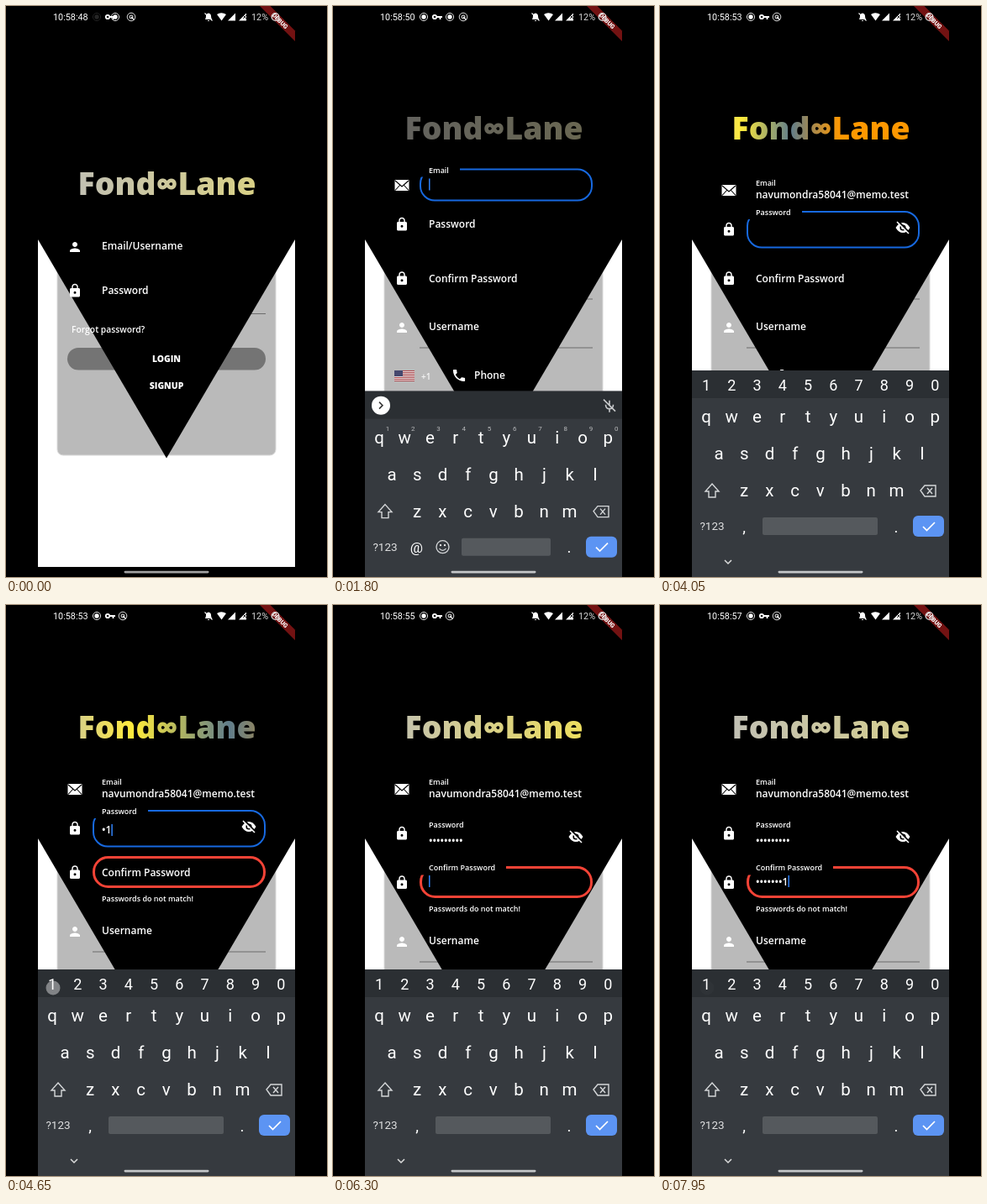
An HTML page that plays this animation: 382x680 px, repeating every 8000 ms.

```html
<!DOCTYPE html>
<html lang="en">
<head>
<meta charset="utf-8">
<title>Sign-up form</title>
<style>
html, body { margin: 0; width: 100%; height: 100%; overflow: hidden; background: #000; }
svg { display: block; width: 382px; height: 680px; }
text { font-family: "Open Sans", sans-serif; font-weight: 600; fill: #fff; white-space: pre; }
#keys text, #bar text { font-family: Roboto, sans-serif; font-weight: 400; }
#title { font-size: 37.3px; font-weight: 800; fill: url(#shine); text-anchor: middle; }
</style>
</head>
<body>
<svg id="stage" viewBox="0 0 382 680">
  <defs>
    <linearGradient id="shine" gradientUnits="userSpaceOnUse" x1="38" x2="300" y1="0" y2="0">
      <stop offset="0" stop-color="#bdbdbd"/>
      <stop offset=".3333" stop-color="#ffeb3b"/>
      <stop offset=".6667" stop-color="#607d8b"/>
      <stop offset="1" stop-color="#ff9800"/>
    </linearGradient>
    <clipPath id="input"><rect x="113.5" y="0" width="186" height="680"/></clipPath>
    <clipPath id="phone"><rect x="38" width="306" height="680"/></clipPath>
  </defs>
  <rect width="382" height="680"/>
  <rect x="38" y="270" width="306" height="398" fill="#fff"/>
  <g id="low"></g>
  <path d="M38 0H344V278L191 538.5L38 278Z"/>
  <text id="title" x="191.5">Fond∞Lane</text>
  <g id="form"></g>
  <g id="keys" clip-path="url(#phone)"></g>
  <g id="bar"></g>
  <circle id="touch" r="8.5" fill="#fff"/>
</svg>
<script>
const LOOP = 8000;
const $ = id => document.getElementById(id);
const low = $("low"), form = $("form"), bar = $("bar");

// Moments at which the form changes
const SIGNUP = 250, EMAIL = 1500, FILL = 3080, PASS = 3500, ERR = 4440, CONFIRM = 6050;
const USER = "tenavu", MAIL = "tenavumondra58041@memo.test";
const emailType = { at: 2040, gap: 150, n: 6 };
const passType = { at: ERR, gap: 190, n: 9 };
const confType = { at: 6500, gap: 190, n: 8 };

const clamp = x => Math.max(0, Math.min(1, x));
const ease = x => x * x * (3 - 2 * x);
// Value at t after a series of eased [start, target] changes
function track(t, v, ...steps) {
  for (const [at, to] of steps) v += (to - v) * ease(clamp((t - at) / 200));
  return v;
}
const typed = (t, s) => t < s.at ? 0 : Math.min(s.n, 1 + Math.floor((t - s.at) / s.gap));

function set(node, attrs) {
  for (const k in attrs) node.setAttribute(k, attrs[k]);
  return node;
}
function el(parent, tag, attrs = {}) {
  return parent.appendChild(set(document.createElementNS("http://www.w3.org/2000/svg", tag), attrs));
}
const group = (p, attrs) => el(p, "g", attrs);
const path = (p, d, attrs) => el(p, "path", { d, fill: "#fff", ...attrs });
const stroke = (p, d, color = "#fff", w = 1.5) => path(p, d, { fill: "none", stroke: color, "stroke-width": w });
const rect = (p, x, y, width, height, fill, rx = 0) => el(p, "rect", { x, y, width, height, fill, rx });
const dot = (p, cx, cy, r, attrs) => el(p, "circle", { cx, cy, r, fill: "#fff", ...attrs });
const move = (n, x, y, s = 1) => set(n, { transform: `translate(${x} ${y}) scale(${s})` });
const show = (n, o) => set(n, { opacity: +o });
// y is the optical middle of the line
function label(p, x, y, str, size, attrs) {
  const n = el(p, "text", { x, y: y + size * .36, "font-size": size, ...attrs });
  n.textContent = str;
  return n;
}
const mid = { "text-anchor": "middle" };
const heavy = { ...mid, style: "font-weight:800" };

// Icons, centred on 0,0
const glyphs = {
  person: "M12 12c2.2 0 4-1.8 4-4s-1.8-4-4-4-4 1.8-4 4 1.8 4 4 4zm0 2c-2.7 0-8 1.3-8 4v2h16v-2c0-2.7-5.3-4-8-4z",
  lock: "M18 8h-1V6c0-2.8-2.2-5-5-5S7 3.2 7 6v2H6c-1.1 0-2 .9-2 2v10c0 1.1.9 2 2 2h12c1.1 0 2-.9 2-2V10c0-1.1-.9-2-2-2zm-6 9a2 2 0 010-4 2 2 0 010 4zm3.1-9H8.9V6a3.1 3.1 0 016.2 0z",
  phone: "M6.6 10.8c1.4 2.8 3.8 5.1 6.6 6.6l2.2-2.2c.3-.3.7-.4 1-.2 1.1.4 2.3.6 3.6.6.5 0 1 .4 1 1V20c0 .5-.5 1-1 1C10.6 21 3 13.4 3 4c0-.5.5-1 1-1h3.5c.5 0 1 .5 1 1 0 1.3.2 2.5.6 3.6.1.3 0 .7-.3 1z"
};
function icon(p, name) {
  const g = group(p);
  path(g, glyphs[name], { transform: "scale(.75) translate(-12 -12)" });
  return g;
}
function mailIcon(p) {
  const g = group(p);
  rect(g, -8.5, -6.5, 17, 13, "#fff", 1);
  stroke(g, "M-8-5.5L0 1.5L8-5.5M-8 6L-2.5 0M8 6L2.5 0", "#000", 1.1);
  return g;
}
function eyeOff(p) {
  const g = group(p);
  path(g, "M-8.5 0Q-5-6 0-6T8.5 0Q5 6 0 6T-8.5 0");
  dot(g, 0, 0, 3.6, { fill: "#000" });
  dot(g, 0, 0, 2);
  stroke(g, "M-6-8L8 6", "#000", 2);
  stroke(g, "M-7-7L7 7");
  return g;
}

// Layer under the dark wedge
const card = rect(low, 61, 250, 260, 285, "#bababa", 7);
set(card, { stroke: "#d8d8d8", "stroke-width": 1 });
const line = (p, x, y) => rect(p, x, y - .5, 309 - x, 1, "#6c6c6c");
const loginLine = line(low, 103, 366.5);
const confLine = line(low, 103, 361);
const lowRest = group(low);
line(lowRest, 103, 419);
line(lowRest, 132, 477);
const button = rect(low, 73, 407, 236, 26.5, "#747474", 13.2);

// Form
const loginOnly = group(form), signOnly = group(form);
label(loginOnly, 78, 385, "Forgot password?", 10.3);
const loginMail = group(form);
move(icon(loginMail, "person"), 82, 1);
label(loginMail, 114, 0, "Email/Username", 12);
const act1 = label(form, 191, 0, "LOGIN", 10.4, heavy);
const act2 = label(form, 191, 0, "SIGNUP", 10.4, heavy);

function field(name, iconNode, gapEnd, color, width) {
  const f = { box: group(form) };
  f.frame = rect(f.box, 103 + width / 2, 0, 206 - width, 36, "none", 17);
  set(f.frame, { stroke: color, "stroke-width": width });
  f.gap = rect(f.box, 100, -4, gapEnd - 100, 13, "#000");
  f.icon = iconNode;
  f.name = group(form);
  label(f.name, 0, 0, name, 12);
  const clip = group(form, { "clip-path": "url(#input)" });
  f.text = label(clip, 114, 0, "", 12);
  f.cursor = rect(form, 0, -7, 1.5, 14, "#2f80f5");
  return f;
}
const email = field("Email", mailIcon(form), 151, "#1769e0", 2);
const pass = field("Password", icon(form, "lock"), 169, "#1769e0", 2);
const conf = field("Confirm Password", icon(signOnly, "lock"), 206, "#f44336", 3);
const compose = rect(form, 114, 218.5, 10, 1, "#fff");
const eye = eyeOff(form);
const error = label(form, 114, 0, "Passwords do not match!", 9);

const rest = group(signOnly);
move(icon(rest, "person"), 82, 395);
label(rest, 114, 394, "Username", 12);
const flag = group(rest);
rect(flag, 73, 446, 24, 13, "#e4dede");
for (let i = 0; i < 7; i++) rect(flag, 73, 446 + i * 2, 24, 1, "#b04a50");
rect(flag, 73, 446, 10, 7, "#45486e");
label(rest, 105, 453, "+1", 10, { opacity: .85 });
move(icon(rest, "phone"), 150, 452, 1.05);
label(rest, 168, 452, "Phone", 12);

// Keyboard
const kb = group($("keys"));
rect(kb, 38, 434, 306, 246, "#363a3f");
rect(kb, 38, 434, 306, 33, "#2b2f33");
const mailKeys = group(kb), passKeys = group(kb);
const spots = {};
[["qwertyuiop", 55, 489], ["asdfghjkl", 70, 533], ["zxcvbnm", 100, 577]].forEach(([row, x0, y]) =>
  [...row].forEach((c, i) => {
    spots[c] = [x0 + i * 30.25, y];
    label(kb, ...spots[c], c, 20.5, mid);
  }));
for (let i = 0; i < 10; i++) {
  const x = 55 + i * 30.25, d = (i + 1) % 10;
  label(mailKeys, x + 10, 478, d, 8, { ...mid, opacity: .65 });
  label(passKeys, x, 451.5, d, 18, mid);
}
stroke(kb, "M62 569L70 578H66V585H58V578H54Z", "#d5d7d9", 1.4);
stroke(kb, "M310 577L315 571H328V584H315ZM318 574L324 581M324 574L318 581", "#d5d7d9", 1.4);
label(kb, 62, 619.5, "?123", 13.5, { ...mid, opacity: .85 });
label(kb, 281, 620, ".", 19, mid);
rect(kb, 301, 607, 37, 25, "#5c94f3", 6);
stroke(kb, "M313 620L317.5 624.5L327 615", "#fff", 1.7);
stroke(kb, "M77 660L81 664L85 660", "#ddd");
rect(passKeys, 122, 609, 137, 21, "#55595d", 2);
label(passKeys, 100, 620, ",", 19, mid);
rect(mailKeys, 153, 609, 106, 21, "#55595d", 2);
label(mailKeys, 99.5, 620, "@", 17, mid);
stroke(mailKeys, "M123 619.5a7.5 7.5 0 0 1 15 0a7.5 7.5 0 0 1-15 0M126.5 621.5Q130.5 626 134.5 621.5", "#d5d7d9", 1.3);
dot(mailKeys, 128, 617.5, 1.1);
dot(mailKeys, 133, 617.5, 1.1);

// Suggestions
dot(mailKeys, 57, 451, 11);
stroke(mailKeys, "M55 447L59 451L55 455", "#333");
const hint = label(mailKeys, 105.5, 451, "", 13.5, { ...mid, opacity: .8 });
const hints = group(mailKeys);
[[186, "tenavum…a58041"], [273, "tenavum…dra41"]].forEach(([x, s]) => {
  label(hints, x, 443, s, 10.2, mid);
  label(hints, x + 4, 457, "@memo.test", 9.3, { ...mid, opacity: .8 });
});
rect(hints, 145, 443, 1, 16, "#44494e");
rect(hints, 232, 443, 1, 16, "#44494e");
stroke(mailKeys, "M329 445v6M324.5 450q0 5 4.5 5t4.5-5M329 455v4M322 444L336 458", "#c8cacc", 1.6);

// Debug ribbon and status bar
path(bar, "M302 0H314.5L344 29.5V42Z", { fill: "#731212" });
label(bar, 0, 0, "DEBUG", 7.2, { ...mid, transform: "translate(326.2 17.8) rotate(45)", style: "font-weight:900" });
const clock = label(bar, 56, 13, "", 10.8);
function record() {
  const g = group(bar);
  dot(g, 0, 0, 4.6, { fill: "none", stroke: "#ddd" });
  dot(g, 0, 0, 2.7);
  return g;
}
const rec1 = record(), rec2 = record(), key = group(bar), cast = group(bar);
dot(key, -3, 0, 2.2, { fill: "none", stroke: "#fff", "stroke-width": 1.8 });
stroke(key, "M-1 0H6M3.5 0v3", "#fff", 1.8);
dot(cast, 0, 0, 4.8, { fill: "none", stroke: "#ddd" });
dot(cast, 0, 0, 2, { fill: "none", stroke: "#fff" });
stroke(cast, "M0 0L3.5 3.5", "#fff", 1.3);
path(bar, "M237 16Q238 14 238 12Q238 9 241 8.5Q244 9 244 12Q244 14 245 16ZM240 17h2v1h-2Z");
stroke(bar, "M236.5 8.5L245.5 17.5", "#fff", 1.1);
path(bar, "M251 10Q256.5 6.5 262 10L256.5 17.5Z");
path(bar, "M264 17.5L273 8.5V17.5ZM277 17.5L286 8.5V17.5Z");
stroke(bar, "M282 11L286 15M286 11L282 15", "#000", .8);
label(bar, 292, 13, "12%", 10.8, { opacity: .85 });
dot(bar, 320.5, 13, 4.3, { fill: "none", stroke: "#ddd", "stroke-width": 1.3 });
const pill = rect(bar, 140.5, 672.7, 101, 2.8, "#a2a2a2", 1.4);

// Screen touches: [time, x, y]
const taps = [[SIGNUP - 60, 191, 452], [EMAIL - 60, 200, 219], [FILL - 40, 186, 450],
  [PASS - 60, 200, 260], [CONFIRM - 60, 200, 318]];
[...USER].forEach((c, i) => taps.push([emailType.at + i * emailType.gap, ...spots[c]]));
for (const s of [passType, confType])
  for (let i = 0; i < s.n; i++) taps.push([s.at + i * s.gap, 56, 456]);

function drawCursor(f, t, on, y, last) {
  const x = Math.min(298, 114 + f.text.getComputedTextLength());
  move(f.cursor, x, y);
  show(f.cursor, on && (t - last) % 1000 < 500);
}
function frame(f, top, height, alpha, gap) {
  move(f.box, 0, top);
  set(f.frame, { height });
  show(f.box, alpha);
  show(f.gap, gap);
}
const textY = (f, y) => set(f.text, { y: y + 4.3 });
const secret = (n, open) => n && open ? "•".repeat(n - 1) + "1" : "•".repeat(n);
const lastKey = (s, n, from) => n ? s.at + (n - 1) * s.gap : from;

// The gradient stretches from left to right while the title fades in and out
function drawTitle(t) {
  const cycle = 7500;
  const age = (t - 2570 + cycle) % cycle;
  set($("shine"), { x2: 38.5 + 180 * Math.pow(age / 1500, 1.95) });
  set($("title"), {
    y: track(t, 225, [SIGNUP, 158.5]),
    opacity: Math.min(clamp(age / 700), clamp((cycle - age) / 1500))
  });
}

function drawForm(t) {
  const to = (y, ...s) => track(t, y, ...s);
  const sign = to(0, [SIGNUP, 1]), isSign = t > SIGNUP + 100;
  const off = to(0, [EMAIL, -12], [ERR, -6], [CONFIRM, 6]);

  set(card, { height: to(285, [SIGNUP, 351]) + off });
  set(button, { y: to(407, [SIGNUP, 490]) + off });
  set(act1, { y: to(424, [SIGNUP, 507.3]) + off });
  set(act2, { y: to(455.5, [SIGNUP, 538.8]) + off });
  act1.textContent = isSign ? "SIGN UP" : "LOGIN";
  act2.textContent = isSign ? "LOGIN" : "SIGNUP";
  show(loginOnly, 1 - sign);
  show(loginLine, 1 - sign);
  show(signOnly, sign);
  show(lowRest, sign);
  move(rest, 0, off);
  move(lowRest, 0, off);
  move(loginMail, 0, to(286, [SIGNUP, 219]));
  show(loginMail, !isSign);

  // Email
  const nMail = typed(t, emailType), filled = t >= FILL;
  move(email.icon, 82, to(287, [SIGNUP, 219.5], [EMAIL, 213.5], [PASS, 219.5]));
  show(email.icon, isSign);
  move(email.name, 114, to(286, [SIGNUP, 219], [EMAIL, 195.5], [PASS, 211]), to(1, [EMAIL, .75]));
  show(email.name, isSign);
  frame(email, to(201, [EMAIL, 194.5], [PASS, 202]), 37, to(0, [EMAIL, 1], [PASS, 0]), 1);
  email.text.textContent = filled ? MAIL : USER.slice(0, nMail);
  set(email.text, { x: filled ? 296 : 114, "text-anchor": filled ? "end" : "start" });
  textY(email, to(213, [PASS, 225]));
  drawCursor(email, t, t > EMAIL && t < PASS, 212.5, filled ? FILL : lastKey(emailType, nMail, EMAIL));
  set(compose, { width: filled ? 0 : email.text.getComputedTextLength() });

  // Password
  const nPass = typed(t, passType);
  move(pass.icon, 82, to(339, [SIGNUP, 272], [EMAIL, 260], [PASS, 266], [CONFIRM, 272]));
  move(pass.name, 114, to(339, [SIGNUP, 272], [EMAIL, 260], [PASS, 246], [CONFIRM, 261.5]), to(1, [PASS, .75]));
  frame(pass, to(245, [CONFIRM, 251.5]), 42.5, to(0, [PASS, 1], [CONFIRM, 0]), 1);
  pass.text.textContent = secret(nPass, t < CONFIRM);
  textY(pass, to(268, [CONFIRM, 280.5]));
  drawCursor(pass, t, t > PASS && t < CONFIRM, 268, lastKey(passType, nPass, PASS));
  move(eye, 289, to(264, [CONFIRM, 276]));
  show(eye, to(0, [PASS, 1]));

  // Confirm password
  const nConf = typed(t, confType);
  move(conf.icon, 82, to(337, [EMAIL, 324.5], [ERR, 318.5], [CONFIRM, 330.5]));
  move(conf.name, 114, to(337, [EMAIL, 324.5], [ERR, 318.5], [CONFIRM, 313]), to(1, [CONFIRM, .75]));
  show(conf.name, sign);
  frame(conf, to(300.5, [CONFIRM, 312.5]), 35, to(0, [ERR, 1]), t > CONFIRM + 80);
  conf.text.textContent = secret(nConf, true);
  textY(conf, 329.5);
  drawCursor(conf, t, t > CONFIRM, 329, lastKey(confType, nConf, CONFIRM));
  set(error, { y: to(353.3, [CONFIRM, 365.3]) });
  show(error, to(0, [ERR, 1]));
  move(confLine, 0, off);
  show(confLine, sign * to(1, [ERR, 0]));

  // Keyboard
  move(kb, 0, 246 * (1 - ease(clamp((t - 1600) / 250))));
  show(mailKeys, t < PASS + 60);
  show(passKeys, t >= PASS + 60);
  hint.textContent = filled ? "" : USER.slice(0, nMail);
  show(hints, nMail > 1 && !filled);
}

function drawBar(t) {
  clock.textContent = "10:58:" + Math.floor(48.92 + t * .00102);
  const start = ease(clamp(t / 200)), gone = track(t, 0, [3300, 1]);
  move(rec1, 108, 13);
  show(rec1, .15 + .85 * start);
  move(key, 124, 13);
  move(rec2, 130 + 9 * start, 13);
  show(rec2, 1 - gone);
  move(cast, 149 + 6 * start - 16 * gone, 13);
  set(pill, { fill: t > 1800 ? "#c4c6c8" : "#a2a2a2" });

  const tap = taps.find(([at]) => t >= at && t < at + 150);
  show($("touch"), tap ? .55 * (1 - (t - tap[0]) / 150) ** 2 : 0);
  if (tap) move($("touch"), tap[1], tap[2]);
}

function render() {
  const t = performance.now() % LOOP;
  drawTitle(t);
  drawForm(t);
  drawBar(t);
  requestAnimationFrame(render);
}
render();
</script>
</body>
</html>
```
